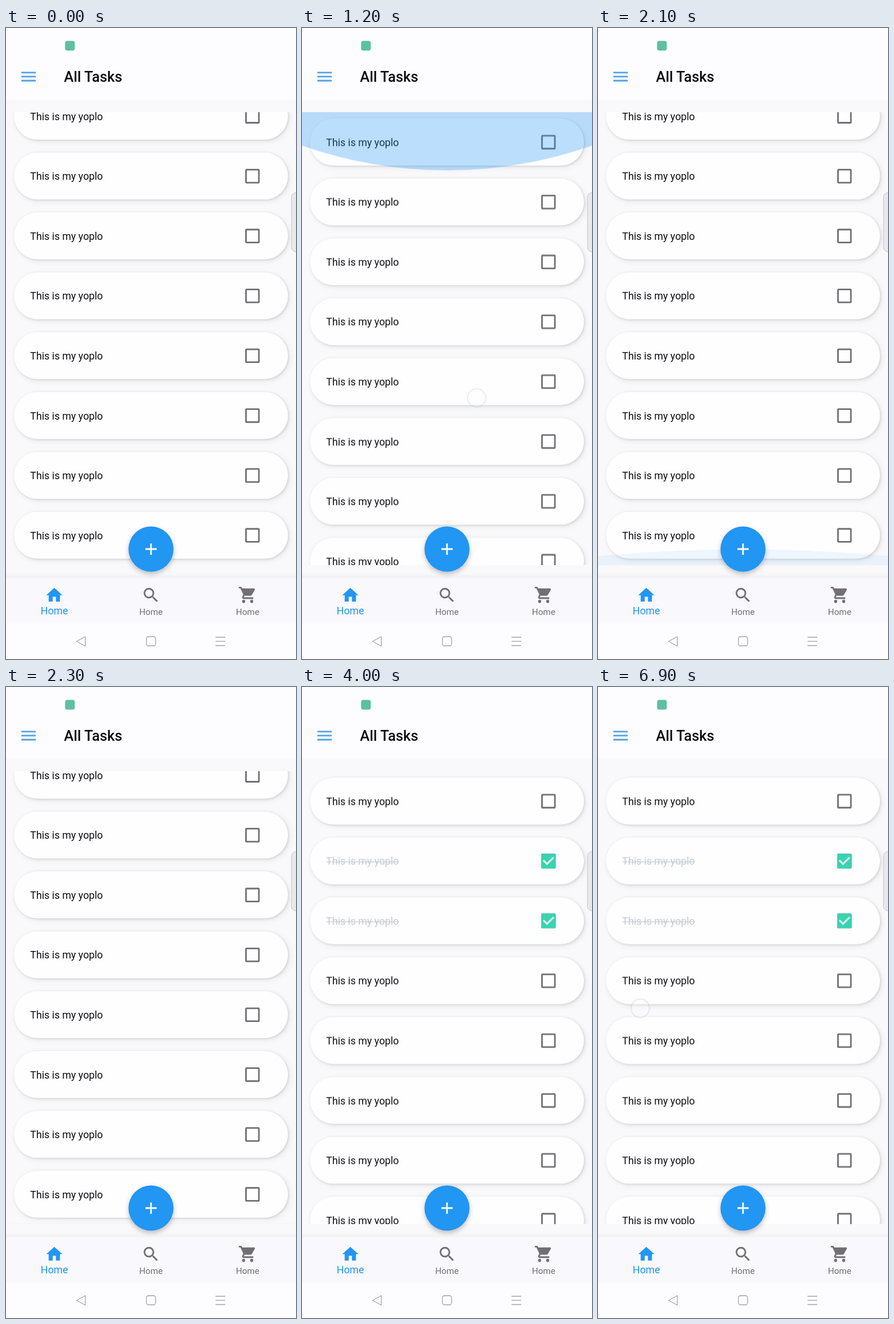
An HTML page that plays this animation: 508x1102 px, repeating every 7 s.

```html
<!DOCTYPE html>
<html lang="en">
<head>
<meta charset="utf-8">
<title>All Tasks</title>
<style>
  html, body { margin: 0; width: 100%; height: 100%; overflow: hidden; background: #fdfcfe; }
  svg { display: block; width: 508px; height: 1102px; font-family: Roboto, sans-serif; }
  .card { fill: #fefdff; filter: drop-shadow(1px 1px 2px rgba(0,0,0,.13)) drop-shadow(3px 3px 5px rgba(0,0,0,.07)); }
  .label { font-size: 17.78px; fill: #0c0c0e; }
  .box { fill: none; stroke: #716f73; stroke-width: 2.8; }
  .tick { fill: none; stroke: #fff; stroke-width: 2.8; stroke-dasharray: 26; }
  .strike { stroke: #c3cbd6; stroke-width: 1.3; }
  .done, .glow, #touch { opacity: 0; }
  .glow { fill: #2196f3; }
  .nav text { text-anchor: middle; font-size: 15.24px; }
  .nav .on { font-size: 17.78px; }
  .nav { fill: #716f73; }
  .on { fill: #2196f3; }
  .keys { fill: none; stroke: #a3a2a5; stroke-width: 1.3; }
  .fab { fill: #2196f3; filter: drop-shadow(0 4px 4px rgba(0,0,0,.24)); }
</style>
</head>
<body>
<svg viewBox="0 0 508 1102">
  <defs>
    <clipPath id="view"><rect y="147" width="508" height="791"/></clipPath>
    <linearGradient id="edge" x2="0" y2="1">
      <stop offset="0" stop-opacity="0"/><stop offset="1" stop-opacity=".035"/>
    </linearGradient>
  </defs>

  <rect width="508" height="1102" fill="#fdfcfe"/>
  <rect y="125" width="508" height="835" fill="#f9f8fb"/>

  <rect x="103.5" y="22.5" width="17" height="17" rx="4" fill="#5cc0a2"/>
  <path transform="translate(22.6 68) scale(1.411)" fill="#56a2e0" d="M3 18h18v-2H3zm0-5h18v-2H3zm0-7v2h18V6z"/>
  <text x="101.6" y="94" font-size="25.4" font-weight="500" fill="#09090b">All Tasks</text>

  <g clip-path="url(#view)">
    <g id="list"></g>
    <g transform="translate(0 147)"><path id="top" class="glow" d="M0 0H508V58.5A762 762 0 0 1 0 58.5Z"/></g>
    <g transform="translate(0 938) scale(1 -1)"><path id="bottom" class="glow" d="M0 0H508V58.5A762 762 0 0 1 0 58.5Z"/></g>
  </g>

  <rect x="500" y="287.5" width="20" height="103.5" rx="8" fill="#e9e8ea" stroke="#c6c5c8"/>

  <rect y="953" width="508" height="8" fill="url(#edge)"/>
  <rect y="961" width="508" height="79" fill="#f9f8fc"/>
  <g class="nav">
    <path class="on" transform="translate(67.7 973.6) scale(1.411)" d="M10 20v-6h4v6h5v-8h3L12 3 2 12h3v8z"/>
    <path transform="translate(237 973.6) scale(1.411)" d="M15.5 14h-.79l-.28-.27C15.41 12.59 16 11.11 16 9.5 16 5.91 13.09 3 9.5 3S3 5.91 3 9.5 5.91 16 9.5 16c1.61 0 3.09-.59 4.23-1.57l.27.28v.79l5 4.99L20.49 19l-4.99-5zm-6 0C7.01 14 5 11.99 5 9.5S7.01 5 9.5 5 14 7.01 14 9.5 11.99 14 9.5 14z"/>
    <path transform="translate(406.4 973.2) scale(1.411)" d="M7 18c-1.1 0-1.99.9-1.99 2S5.9 22 7 22s2-.9 2-2-.9-2-2-2zM1 2v2h2l3.6 7.59-1.35 2.45c-.16.28-.25.61-.25.96 0 1.1.9 2 2 2h12v-2H7.42c-.14 0-.25-.11-.25-.25l.03-.12.9-1.63h7.45c.75 0 1.41-.41 1.75-1.03l3.58-6.49c.08-.14.12-.31.12-.48 0-.55-.45-1-1-1H5.21l-.94-2H1zm16 16c-1.1 0-1.99.9-1.99 2s.89 2 1.99 2 2-.9 2-2-.9-2-2-2z"/>
    <text class="on" x="84.7" y="1024">Home</text>
    <text x="254" y="1024.5">Home</text>
    <text x="423.3" y="1024.5">Home</text>
  </g>

  <g class="keys">
    <path d="M139 1063V1079.500L123.500 1071.200Z" stroke-linejoin="round"/>
    <rect x="246" y="1063" width="16" height="16" rx="3.500"/>
    <path d="M367 1064h17M367 1071.200h17M367 1078.500h17"/>
  </g>

  <circle class="fab" cx="254" cy="910" r="39.5"/>
  <path d="M244.2 910h19.700M254 900.200v19.700" stroke="#fff" stroke-width="2.8"/>

  <g id="touch"><circle r="16" fill="#fff" fill-opacity=".45" stroke="#b4c4dc" stroke-opacity=".8" stroke-width="2"/></g>
</svg>

<script>
  const LOOP = 7000;
  const SCROLL = 45.2;
  const DECEL = 'cubic-bezier(.333,.667,.667,1)';
  const $ = id => document.getElementById(id);

  // Steps are [time, properties, easing to the next step].
  function play(el, steps) {
    const frames = steps.map(([t, props, easing = 'linear']) => ({ offset: t / LOOP, easing, ...props }));
    frames.unshift({ ...frames[0], offset: 0, easing: 'linear' });
    frames.push({ ...frames[frames.length - 1], offset: 1 });
    el.animate(frames, { duration: LOOP, iterations: Infinity });
  }

  const list = $('list');
  for (let i = 0; i < 8; i++) {
    list.insertAdjacentHTML('beforeend', `
      <g transform="translate(0 ${158.2 + 104.55 * i})">
        <rect class="card" x="14" width="480" height="82" rx="41"/>
        <text class="label" x="42.3" y="47.8">This is my yoplo</text>
        <rect class="box" x="420.4" y="29.900" width="22.6" height="22.6" rx=".8"/>
        <g class="done">
          <path class="strike" d="M42.3 42.7h127.400"/>
          <rect x="419" y="28.500" width="25.4" height="25.4" rx="1.4" fill="#38d4b1"/>
          <path class="tick" d="M422.8 39.900l6.400 6.400l11.400 -11.400"/>
        </g>
      </g>`);
  }

  const scroll = y => ({ transform: `translateY(${-y}px)` });
  play(list, [
    [120, scroll(SCROLL), DECEL], [450, scroll(0)],
    [1640, scroll(0), DECEL], [1820, scroll(SCROLL)],
    [2480, scroll(SCROLL), DECEL], [2750, scroll(0)]
  ]);

  const glow = (size, opacity) => ({ transform: `scaleY(${size})`, opacity });
  play($('top'), [[880, glow(0, 0)], [1150, glow(1, .3)], [1200, glow(1, .3), DECEL], [1750, glow(0, 0)]]);
  play($('bottom'), [[1760, glow(0, 0)], [1850, glow(.9, .25), DECEL], [2400, glow(0, 0)]]);

  function check(i, t) {
    const row = list.children[i];
    const part = name => row.querySelector(name);
    play(part('.done'), [[t, { opacity: 0 }], [t + 60, { opacity: 1 }]]);
    play(part('.tick'), [[t + 60, { strokeDashoffset: 26 }], [t + 200, { strokeDashoffset: 0 }]]);
    play(part('.label'), [[t, { fill: '#0c0c0e' }], [t, { fill: '#c3cbd6' }]]);
  }
  check(2, 3300);
  check(1, 3700);

  // Each touch: down, release, gone, then where it starts and ends.
  const touches = [
    [100, 330, 450, 300, 430, 304, 560],
    [860, 1130, 1240, 300, 480, 306, 646],
    [1590, 1780, 1880, 318, 640, 324, 480],
    [2440, 2640, 2760, 320, 480, 328, 600],
    [3180, 3320, 3450, 432, 412, 432, 412],
    [3580, 3820, 3980, 430, 307, 428, 311],
    [5420, 5750, 5890, 57, 565, 57, 565],
    [6180, 6370, 6490, 64, 563, 66, 562],
    [6780, 6850, 6935, 74, 561, 74, 561]
  ];
  const at = (x, y, opacity) => ({ transform: `translate(${x}px, ${y}px)`, opacity });
  play($('touch'), touches.flatMap(([down, up, gone, x0, y0, x1, y1]) => [
    [down, at(x0, y0, 0)],
    [down + 60, at(x0, y0, 1)],
    [up, at(x1, y1, 1)],
    [gone, at(x1, y1, 0)]
  ]));
</script>
</body>
</html>
```
